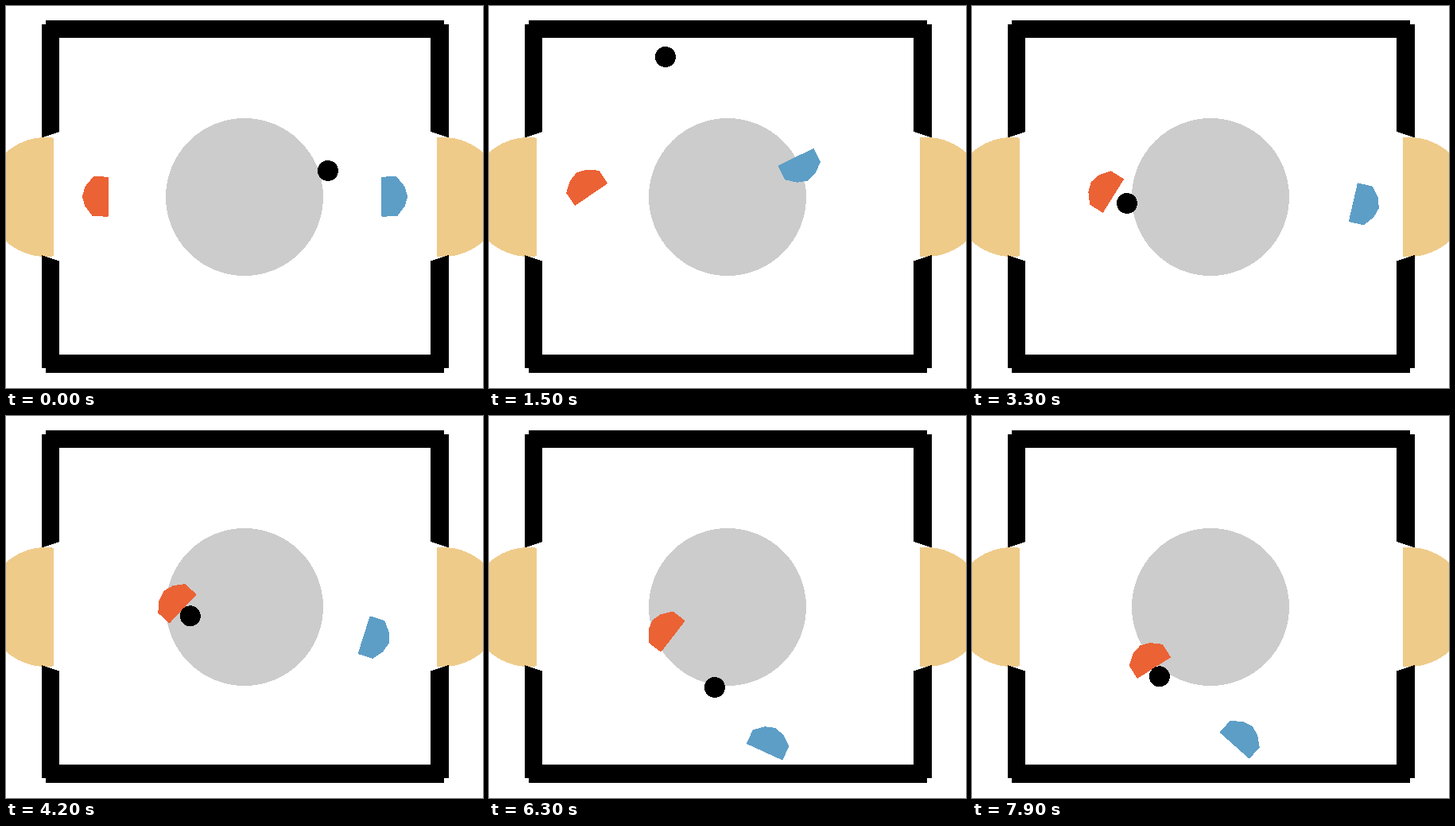
These frames come from a looping animation (600x480 px, 8 s). An HTML page:

```html
<!DOCTYPE html>
<html lang="en">
<head>
<meta charset="utf-8">
<title>Air hockey</title>
<style>
  html, body { margin: 0; width: 100%; height: 100%; overflow: hidden; background: #fff; }
  svg { display: block; width: 600px; height: 480px; shape-rendering: crispEdges; }
  .goal { fill: #efcb8a; }
  .racket { stroke-width: 2; stroke-linejoin: round; }
  #red { fill: #eb6235; stroke: #eb6235; }
  #blue { fill: #5d9ec7; stroke: #5d9ec7; }
</style>
</head>
<body>
<svg viewBox="0 0 600 480">
  <defs>
    <path id="wall" d="M45 23H67.2V158L45 165.5zM45 313L67.2 320.5V455H45z"/>
    <path id="shape" d="M-12 24H6V-24H-12L-21.6 -12L-25.2 0L-21.6 12z"/>
  </defs>
  <rect width="600" height="480" fill="#fff"/>
  <circle class="goal" cx="50" cy="240" r="75"/>
  <circle class="goal" cx="550" cy="240" r="75"/>
  <rect x="60" y="160" width="482" height="160" fill="#fff"/>
  <circle cx="300" cy="240" r="99" fill="#ccc"/>
  <path d="M50 18H551V40H50zM50 438H551V461H50z"/>
  <use href="#wall"/>
  <use href="#wall" transform="translate(601.6) scale(-1 1)"/>
  <g id="red" class="racket"><use href="#shape"/></g>
  <g id="blue" class="racket"><use href="#shape" transform="scale(-1 1)"/></g>
  <circle id="puck" r="13"/>
</svg>
<script>
  const LOOP = 8000, STEP = 100, REACH = 19.7;
  const TOP = 53.5, BOTTOM = 425;

  // Each round: racket poses [time, x, y, angle], and puck flight corners
  // [time, x, y] whose y runs on past the walls and is folded back.
  const rounds = [
    {
      start: 0,
      red: [[0, 122, 239.5, 1], [1100, 123, 241.5, 28], [1500, 124.8, 231.2, 55.7], [2400, 110.3, 194.5, 41]],
      blue: [[0, 479, 239.5, -1], [900, 419.5, 223, 38], [1500, 389, 196, 64], [2400, 352, 221.4, 19]],
      flights: [[[900, 405, 207], [1500, 222, 64], [2400, 34, -118]]]
    },
    {
      start: 2500,
      red: [
        [2500, 122, 239.5, 2], [3300, 172, 235, 32], [3600, 194, 236.5, 41], [4200, 217.5, 237.8, 43.4],
        [5000, 207, 260.5, 43], [5300, 216.2, 266.7, 39.4], [5700, 226, 251.5, 38],
        [6300, 226, 272.8, 37.6], [7300, 213.5, 289, 43], [7900, 225.3, 310.7, 57.6]
      ],
      blue: [
        [2500, 484.5, 241.5, -1], [3600, 483.5, 253, 17], [4200, 456.8, 277.2, 17.7],
        [5300, 391, 359.7, 26.6], [6300, 349.5, 415.9, -65.5], [7900, 334.8, 409, -48.3]
      ],
      flights: [
        [[3400, 195, 248]],
        [[5000, 221, 274], [5300, 300, 364], [5540, 354, 443], [6300, 284, 509], [6900, 233, 556]]
      ]
    }
  ];

  const fold = y => y < TOP ? 2 * TOP - y : y > BOTTOM ? 2 * BOTTOM - y : y;

  // Index of the key that ends the span holding t.
  const spanEnd = (keys, t) => Math.max(1, keys.findIndex(k => k[0] >= t));

  function linear(keys, t) {
    if (t <= keys[0][0]) return keys[0];
    const i = spanEnd(keys, t), a = keys[i - 1], b = keys[i];
    const s = (t - a[0]) / (b[0] - a[0]);
    return a.map((v, n) => v + (b[n] - v) * s);
  }

  // Smooth curve through the keys (Hermite with neighbour slopes).
  function smooth(keys, t) {
    const i = spanEnd(keys, t), a = keys[i - 1], b = keys[i];
    const before = keys[i - 2] || a, after = keys[i + 1] || b;
    const d = b[0] - a[0], s = (t - a[0]) / d, r = 1 - s;
    return a.map((v, n) => {
      const slopeA = (b[n] - before[n]) / (b[0] - before[0]);
      const slopeB = (after[n] - v) / (after[0] - a[0]);
      return v * r * r * (1 + 2 * s) + b[n] * s * s * (3 - 2 * s)
        + d * s * r * (slopeA * r - slopeB * s);
    });
  }

  // The puck rests or flies; between and after flights red carries it.
  function puckAt(round, red, t) {
    const { flights } = round;
    const flight = flights.find((f, i) =>
      t <= f[f.length - 1][0] && (i === 0 || t >= f[0][0]));
    if (flight) {
      const [, x, y] = linear(flight, t);
      return [x, fold(y)];
    }
    const [, x, y, angle] = red, a = angle * Math.PI / 180;
    return [x + REACH * Math.cos(a), y + REACH * Math.sin(a)];
  }

  const [redEl, blueEl, puckEl] = ["red", "blue", "puck"].map(id => document.getElementById(id));

  function place(el, x, y, angle = 0) {
    el.setAttribute("transform", `translate(${x} ${y}) rotate(${angle})`);
  }

  function draw(now) {
    const t = Math.floor((now % LOOP) / STEP) * STEP;
    const round = rounds[t < rounds[1].start ? 0 : 1];
    const red = smooth(round.red, t);
    place(redEl, ...red.slice(1));
    place(blueEl, ...smooth(round.blue, t).slice(1));
    place(puckEl, ...puckAt(round, red, t));
  }

  const start = performance.now();
  function tick() {
    draw(performance.now() - start);
    requestAnimationFrame(tick);
  }
  tick();
</script>
</body>
</html>
```
